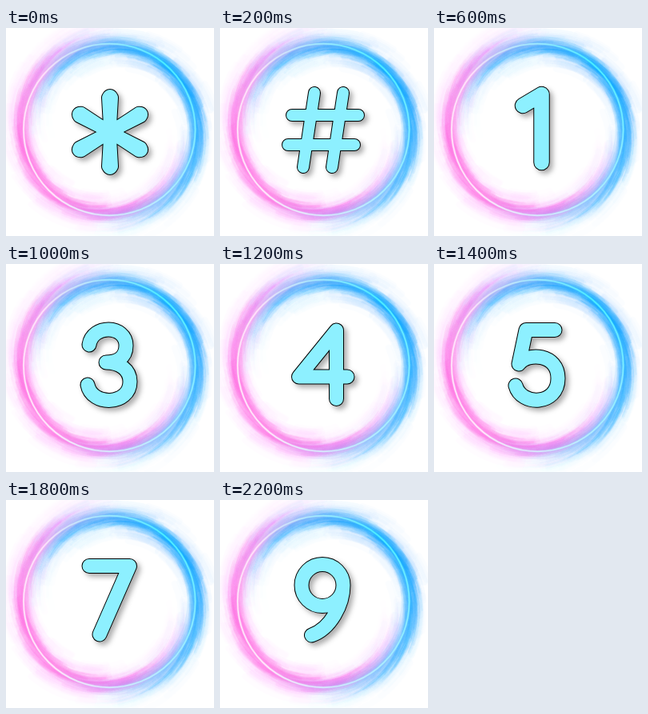
Animation, 260 px wide and 260 px high, one loop 2.4 s. Source, as an HTML page with a canvas:

```html
<!DOCTYPE html>
<html lang="en">
<head>
<meta charset="utf-8">
<title>Keypad symbols</title>
<style>
  html, body { margin: 0; width: 100%; height: 100%; overflow: hidden; background: #fff; }
  canvas, svg { position: absolute; left: 0; top: 0; }
  svg { fill: none; stroke-linecap: round; stroke-linejoin: round; filter: drop-shadow(4.5px 4.5px 3px rgba(0, 0, 0, .32)); }
</style>
</head>
<body>
<canvas id="ring" width="260" height="260"></canvas>
<svg width="260" height="260"><path id="edge" stroke="#000"/><path id="face" stroke="#8df0ff"/></svg>
<script>
const CX = 129.3, CY = 127, R = 107.3, TAU = Math.PI * 2, STEP = 200;
const ctx = document.getElementById('ring').getContext('2d');
const edge = document.getElementById('edge'), face = document.getElementById('face');

let seed = 7;
const rnd = () => (seed = seed * 16807 % 2147483647) / 2147483647;
const spread = () => rnd() + rnd() + rnd() - 1.5;
const rad = deg => deg * Math.PI / 180;
const polar = (a, r) => [CX + r * Math.cos(a), CY + r * Math.sin(a)];

// One streak: an arc that drifts outward as it turns clockwise.
function streak(a, r, len, width, color, alpha) {
  ctx.globalAlpha = alpha;
  ctx.strokeStyle = color;
  ctx.lineWidth = width;
  ctx.beginPath();
  ctx.moveTo(...polar(a - len / 2, r - 7 * len));
  ctx.quadraticCurveTo(...polar(a, r / Math.cos(len / 2)), ...polar(a + len / 2, r + 7 * len));
  ctx.stroke();
}

// A spiral arm, pale at both ends and strongest in the middle.
function arm(start, haze, core) {
  for (let i = 0; i < 1500; i++) {
    const wide = i < 600, t = rnd();
    const a = rad(start + 270 * t);
    const r = R + (t - .5) * 20 + spread() * (wide ? 20 : 9);
    const strength = Math.sin(Math.PI * t) ** (wide ? .8 : 1.5);
    streak(a, r, .3 + rnd() * .4, wide ? 8 : 1.5 + rnd() * 2.5,
      wide ? haze : core, strength * (wide ? .028 : .06));
  }
}

function circle(width, alpha, stops) {
  const paint = ctx.createConicGradient(rad(-50), CX, CY);
  stops.forEach((c, i) => paint.addColorStop(i / (stops.length - 1), c));
  ctx.globalAlpha = alpha;
  ctx.strokeStyle = paint;
  ctx.lineWidth = width;
  ctx.beginPath();
  ctx.arc(CX, CY, R, 0, TAU);
  ctx.stroke();
}

ctx.lineCap = 'round';
arm(5, '#f49cf0', '#ff62dc');
arm(185, '#7cb8ff', '#0a9cf8');
const glow = ['#10b8ff', '#58b8ff', '#ff9cec', '#ff9cec', '#10b8ff'];
for (const width of [20, 14, 9, 5]) circle(width, .13, glow);
circle(3, .4, ['#30e4ff', '#90dcff', '#ffd0f6', '#ffc8f4', '#30e4ff']);
circle(1.7, .9, ['#50f0ff', '#a8f0ff', '#fff0fd', '#ffe6fb', '#50f0ff']);

function star() {
  let d = '';
  for (let k = 0; k < 6; k++) {
    const c = Math.cos(k * TAU / 6), s = Math.sin(k * TAU / 6);
    const p = (x, y) => `${130 + x * c - y * s} ${130 + x * s + y * c}`;
    d += `M130 130L${p(-2.5, -43)}Q${p(0, -48)} ${p(2.5, -43)}Z`;
  }
  return d;
}

// Centre lines in playing order: * # 0 to 9.
const glyphs = [
  star(),
  'M90 109H173M85 146H168M118 81L104 174M154 81L140 174',
  'M128.5 81.5C151 81.5 158.5 101 158.5 126S151 170 128.5 170S98.5 151 98.5 126S106 81.5 128.5 81.5Z',
  'M111 97L134.5 83V168',
  'M104 105C104 74 153 74 153 103C153 129 112 142 105 168H155',
  'M104 101C108 75 150 76 150 102C150 118 138 123 125 123C142 123 155 132 155 147C155 177 107 178 102 151',
  'M159 141H98.5L145.5 83V168.5',
  'M151 82.5H115L106 125C117 110 155 112 155 143C155 177 109 178 102 152',
  'M141.5 82C118 90 102.5 120 102.5 144.5a26 26 0 1 0 52 0a26 26 0 1 0 -52 0',
  'M104 82.5H154.5L117 168',
  'M128.5 81.5a22 20.5 0 1 0 .1 0ZM128.5 122.5a27 23.5 0 1 0 .1 0Z',
  'M114.5 169C138 161 154 131 154 106.5a26 26 0 1 0 -52 0a26 26 0 1 0 52 0'
];
const widths = [17, 16, 20.5, 20.5];

function frame() {
  const i = Math.floor(performance.now() / STEP) % glyphs.length;
  const w = widths[i] || 19;
  edge.setAttribute('d', glyphs[i]);
  face.setAttribute('d', glyphs[i]);
  edge.setAttribute('stroke-width', w);
  face.setAttribute('stroke-width', w - 2);
  requestAnimationFrame(frame);
}
frame();
</script>
</body>
</html>
```
